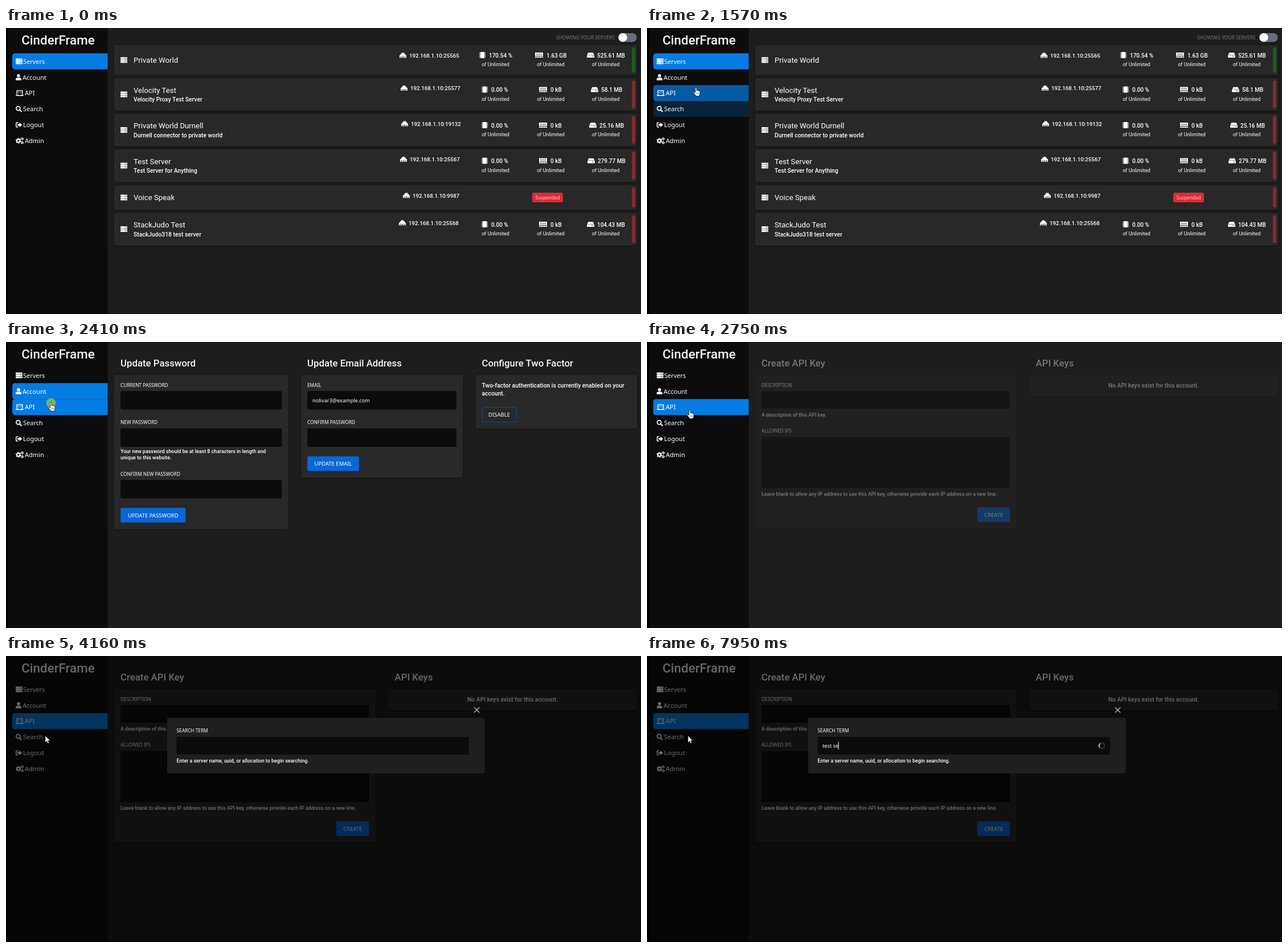
These frames come from a looping animation (1115x502 px, 8000 ms). An HTML page:

```html
<!DOCTYPE html>
<html lang="en">
<head>
<meta charset="utf-8">
<title>Server panel</title>
<style>
html, body { margin: 0; width: 100%; height: 100%; overflow: hidden; background: #1d1d1d; }
svg { display: block; width: 100%; height: 100%; }
text { fill: #fff; white-space: pre; font-family: Roboto, Inter, sans-serif; }
.brand { font-size: 22.4px; font-weight: 500; fill: #f4f4f4; text-anchor: middle; }
.head { font-size: 16.8px; font-weight: 500; fill: #f6f6f6; }
.name { font-size: 13.2px; }
.body { font-size: 10.35px; font-weight: 500; }
.ip { font-size: 9.7px; font-weight: 500; }
.stat { font-size: 10px; font-weight: 500; }
.of { font-size: 9px; text-anchor: middle; }
.hint { font-size: 8.9px; font-weight: 500; }
.nav, .label, .btn, .field, .toggle, .tag { font-family: "Noto Sans", "Open Sans", sans-serif; }
.nav { font-size: 11px; font-weight: 500; }
.label { font-size: 8.3px; }
.btn { font-size: 9.5px; text-anchor: middle; }
.field { font-size: 9.2px; }
.toggle { font-size: 8.5px; fill: #6d7782; }
.tag { font-size: 8.2px; fill: #f3c9cc; text-anchor: middle; }
.mid { text-anchor: middle; }
.card { fill: #282828; filter: drop-shadow(0 1px 2px rgba(0, 0, 0, .35)); }
.input { fill: #0c0c0c; }
.primary { fill: #0967d6; stroke: #0a5dc0; }
.icon { fill: #fff; }
.line { fill: none; stroke: #fff; }
</style>
</head>
<body>
<svg id="stage" viewBox="0 0 1115 502" preserveAspectRatio="none"></svg>
<script>
const LOOP = 8000;
const BLUE = '#047ce4';

const text = (x, y, s, cls) => `<text x="${x}" y="${y}" class="${cls}">${s}</text>`;
const rect = (x, y, w, h, attrs = '', r = 3) =>
  `<rect x="${x}" y="${y}" width="${w}" height="${h}" rx="${r}" ${attrs}/>`;
const card = (x, y, w, h) => rect(x, y, w, h, 'class="card"');
const input = (x, y, w, h) => rect(x, y, w, h, 'class="input"');
const group = (id, inner, attrs = '') => `<g id="${id}" ${attrs}>${inner}</g>`;
const button = (x, y, w, s) =>
  rect(x + .5, y + .5, w - 1, 25, 'class="primary"', 2) + text(x + w / 2, y + 16.5, s, 'btn');

// Icons: left edge at x = 0, vertical centre at y = 0
const icons = {
  server: [-5, -1.5, 2].map(y => rect(0, y, 12, 3, '', .7) +
    `<path d="M7.6 ${y + 1.5}h1m1 0h1" stroke="#333" stroke-width="1"/>`).join(''),
  user: '<circle cx="5" cy="-2.6" r="2.8"/><path d="M0 5.4v-1.4q0-3 3-3h4q3 0 3 3v1.4z"/>',
  laptop: '<path class="line" stroke-width="1.4" d="M2.2 2.2V-4.3H11.8V2.2"/>' +
    '<path class="line" d="M5.8-2.6 4.4-1.1 5.8.4M8.2-2.6 9.6-1.1 8.2.4"/>' +
    '<path d="M0 3h5.4l.4.8h2.4l.4-.8H14q0 2-1.6 2H1.6Q0 5 0 3z"/>',
  search: '<circle class="line" cx="4.4" cy="-1" r="3.5" stroke-width="1.7"/>' +
    '<path class="line" stroke-width="2" stroke-linecap="round" d="M7.2 1.9 10 4.7"/>',
  logout: '<path class="line" stroke-width="1.5" d="M4.2-3.8H1.6Q.8-3.8.8-3V3Q.8 3.8 1.6 3.8H4.2"/>' +
    '<path d="M3.2-1.5H6.6V-4.2L11.2 0 6.6 4.2V1.5H3.2z"/>',
  cogs: '<circle class="line" cx="4.7" cy="0" r="2.7" stroke-width="2"/>' +
    '<circle class="line" cx="4.7" cy="0" r="4.2" stroke-width="1.3" stroke-dasharray="2.2 2.2"/>' +
    [-3.4, 3.4].map(y => `<circle class="line" cx="11.4" cy="${y}" r="1.5" stroke-width="1.2"/>` +
      `<circle class="line" cx="11.4" cy="${y}" r="2.4" stroke-width=".8" stroke-dasharray="1.25 1.25"/>`).join(''),
  net: '<path d="M0 4.5V-.5H1.8V-2.6H3.6V-4.5H8.4V-2.6H10.2V-.5H12V4.5H10.4V1.5H9.4V4.5H7.6V1.5H6.6V4.5H5.4V1.5H4.4V4.5H2.6V1.5H1.6V4.5z"/>',
  cpu: rect(2, -5.5, 7, 11, '', 1) + '<path class="line" stroke-dasharray="1.2 1" d="M.8-4.6V5M10.2-4.6V5" stroke-width="1.6"/>',
  ram: '<path d="M0-4.5H14V-2.3Q13-1.6 14-.9V1.6H0V-.9Q1-1.6 0-2.3zM0 2.4H14V4.5H11.6V3.2H10.8V4.5H7.4V3.2H6.6V4.5H3.2V3.2H2.4V4.5H0z"/>' +
    '<path d="M3.5-3V.2M7-3V.2M10.5-3V.2" stroke="#282828" stroke-width="1.2"/>',
  disk: '<path d="M2.4-4.3H10.6L12.6-.6H.4z"/>' + rect(0, 0, 13, 4.4, '', 1) +
    '<path d="M8 2.2h1.2m.9 0h1.2" stroke="#333" stroke-width="1.2"/>',
};
const icon = (kind, x, y) => `<g class="icon" transform="translate(${x} ${y})">${icons[kind]}</g>`;

const nav = [
  ['Servers', 'server', 30], ['Account', 'user', 29], ['API', 'laptop', 33],
  ['Search', 'search', 30], ['Logout', 'logout', 30], ['Admin', 'cogs', 33],
];

// top, height, name, subtitle, ip x, ip, [x, value] for cpu, ram and disk
const rows = [
  [30, 52.5, 'Private World', '', 708, '192.168.1.10:25565', [[848, '170.54 %'], [949, '1.63 GB'], [1038, '525.61 MB']]],
  [88, 57, 'Velocity Test', 'Velocity Proxy Test Server', 710, '192.168.1.10:25577', [[852, '0.00 %'], [956, '0 kB'], [1045, '58.1 MB']]],
  [150.5, 57, 'Private World Durnell', 'Durnell connector to private world', 711, '192.168.1.10:19132', [[852, '0.00 %'], [956, '0 kB'], [1042, '25.16 MB']]],
  [213, 57, 'Test Server', 'Test Server for Anything', 709, '192.168.1.10:25567', [[852, '0.00 %'], [956, '0 kB'], [1039, '279.77 MB']]],
  [276, 43, 'Voice Speak', '', 714, '192.168.1.10:9987', null],
  [324.5, 57, 'StackJudo Test', 'StackJudo318 test server', 707, '192.168.1.10:25568', [[852, '0.00 %'], [956, '0 kB'], [1038, '104.43 MB']]],
];

function row([y, h, name, sub, ipX, ip, stats], i) {
  const nameY = y + (i ? 21 : 26), ipY = y + (sub ? 17.5 : 18), statY = y + (i ? 20.5 : 18);
  let s = card(190, y, 918, h) +
    rect(190, y + .5, 917.5, h - 1, `id="edge${i}" fill="none" stroke="#e6e6e6" opacity="0"`) +
    rect(1099, y + 4, 6, h - 8, `id="bar${i}" fill="${i ? '#d92f3b' : '#14901c'}" opacity=".5"`) +
    icon('server', 201, y + h / 2) + text(224, nameY + 4.6, name, 'name') +
    icon('net', ipX - 17, ipY) + text(ipX, ipY + 3.6, ip, 'ip');
  if (sub) s += text(224, y + 41, sub, 'body');
  if (stats) {
    s += stats.map(([x, v], k) =>
      icon(['cpu', 'ram', 'disk'][k], x - [17, 20, 18][k], statY - .5) +
      text(x, statY + 3.7, v, 'stat') +
      text([859.5, 956.5, 1053][k], statY + 19, 'of Unlimited', 'of')).join('');
  } else {
    s += rect(924, y + 13, 54, 17, 'fill="#dc2a38"') + text(951, y + 24.6, 'Suspended', 'tag');
  }
  return s;
}

const serversPage = text(966, 19.5, 'SHOWING YOUR SERVERS', 'toggle') +
  rect(1075, 9, 32.5, 15.5, 'fill="#656f7a"', 7.7) + '<circle cx="1083" cy="16.7" r="7.6" fill="#fff"/>' +
  rows.map(row).join('');

const accountPage = text(201, 42.5, 'Update Password', 'head') + card(190, 58, 305.5, 270.5) +
  text(201, 78.7, 'CURRENT PASSWORD', 'label') + input(201, 86, 283.5, 32.5) +
  text(201, 144, 'NEW PASSWORD', 'label') + input(201, 151.5, 283.5, 32.5) +
  text(201, 195, 'Your new password should be at least 8 characters in length and', 'hint') +
  text(201, 206, 'unique to this website.', 'hint') +
  text(201, 234.5, 'CONFIRM NEW PASSWORD', 'label') + input(201, 242, 283.5, 32.5) +
  button(201, 291, 114.5, 'UPDATE PASSWORD') +
  text(529, 42.5, 'Update Email Address', 'head') + card(518, 58, 284, 180) +
  text(529, 78.7, 'EMAIL', 'label') + input(529, 86, 262, 32.5) +
  text(538, 105.7, 'nolivar3@example.com', 'field') +
  text(529, 144, 'CONFIRM PASSWORD', 'label') + input(529, 151.5, 262, 32.5) +
  button(529, 200.5, 91, 'UPDATE EMAIL') +
  text(835.5, 42.5, 'Configure Two Factor', 'head') + card(824.5, 58, 283.5, 94) +
  text(835.5, 79.7, 'Two-factor authentication is currently enabled on your', 'body') +
  text(835.5, 93.5, 'account.', 'body') +
  rect(836, 114.5, 60.5, 26, 'fill="none" stroke="#0c4a93"', 2) + text(866, 131, 'DISABLE', 'btn');

const apiPage = text(201, 42.5, 'Create API Key', 'head') + card(190, 58, 459, 269) +
  text(201, 78.7, 'DESCRIPTION', 'label') + input(201, 86, 436.5, 31) +
  text(201, 131, 'A description of this API key.', 'hint') +
  text(201, 159.3, 'ALLOWED IPS', 'label') + input(201, 167, 436.5, 89.5) +
  text(201, 270.2, 'Leave blank to allow any IP address to use this API key, otherwise provide each IP address on a new line.', 'hint') +
  button(580, 290, 57.5, 'CREATE') +
  text(682.5, 42.5, 'API Keys', 'head') + card(671, 58, 437, 37) +
  text(889.5, 79.7, 'No API keys exist for this account.', 'body mid');

const sidebar = rect(0, 0, 178.5, 502, 'fill="#0c0c0c"', 0) + rect(0, 0, 4, 502, 'fill="#000"', 0) +
  text(91.5, 28.6, 'CinderFrame', 'brand') +
  nav.map(([label, kind, x], i) => {
    const y = 58.4 + 28 * i - .1 * i;
    return `<path id="nav${i}" d="M178.5 ${y - 14}H16q-5 0-5 5v18q0 5 5 5H178.5z" fill="${BLUE}"/>` +
      icon(kind, 17, y) + text(x, y + 4.2, label, 'nav');
  }).join('');

const modal = rect(283, 108.5, 557.5, 97.5, 'fill="#1f1f1f"') +
  '<path d="M822.3 90.5l8.6 8.6m0-8.6l-8.6 8.6" stroke="#b5b5b5" stroke-width="1.4" stroke-linecap="round"/>' +
  text(299.5, 134.3, 'SEARCH TERM', 'label') + input(299.5, 142, 513.5, 31) +
  '<text id="term" x="308" y="160.7" class="field"></text>' +
  rect(0, 150.5, 1, 13.5, 'id="caret" fill="#fff"', 0) +
  text(299.5, 187, 'Enter a server name, uuid, or allocation to begin searching.', 'hint') +
  group('spinner', '<g fill="none" stroke="#fff" stroke-width="1.6"><circle r="4.8" opacity=".22"/>' +
    '<path d="M-3.4-3.4A4.8 4.8 0 0 1 3.4-3.4"/></g>');

const arrow = '<path d="M0 0V11.8L2.7 9.3 4.5 13.4 6.5 12.5 4.7 8.5H8.3z" fill="#fff" stroke="#111" stroke-width=".6"/>';
const hand = '<path d="M-1.2.8Q-1.2-.5 0-.5T1.2.8V5Q2.4 4.3 3.2 5.3 4.5 4.7 5.2 5.8 7 5.5 7 7.3V10.4Q7 12 6 13.2V14.8H-.8V13.4L-4.2 9.2Q-4.8 8-3.7 7.6-2.8 7.4-1.2 9z" fill="#fff" stroke="#111" stroke-width=".8"/>' +
  '<path d="M1.4 8.6V12M3 8.6V12M4.6 8.6V12" stroke="#333" stroke-width=".5"/>';

const stage = document.getElementById('stage');
stage.innerHTML = rect(0, 0, 1115, 502, 'fill="#1d1d1d"', 0) +
  group('servers', serversPage) + group('account', accountPage) + group('api', apiPage) + sidebar +
  rect(0, 0, 1115, 502, 'id="shade" fill="#000"', 0) + group('modal', modal) +
  '<circle id="click" r="8.3" fill="#84bd55" opacity=".9"/>' +
  group('pointer', group('arrow', arrow) + group('hand', hand));

const el = {};
stage.querySelectorAll('[id]').forEach(n => { el[n.id] = n; });

// Tracks are [time, value, ...] and run straight between steps
const fades = {
  servers: [[1830, 1], [1920, .6], [2030, 0]],
  account: [[2030, 0], [2200, 1], [2540, 1], [2680, 0]],
  api: [[2680, 0], [2850, 1]],
  shade: [[3890, 0], [4100, .58]],
  modal: [[3890, 0], [4100, 1]],
  edge4: [[1000, 0], [1070, .27], [1180, 0]],
  edge5: [[640, 0], [790, 1], [1080, 1], [1230, 0]],
  bar5: [[640, .5], [790, .75], [1080, .75], [1230, .5]],
  nav0: [[1830, 1], [1920, .65], [2050, 0]],
  nav1: [[1580, 0], [1700, 1], [2540, 1], [2700, 0]],
  nav2: [[1490, 0], [1570, .7], [1700, 0], [2170, 0], [2300, 1]],
  nav3: [[1400, 0], [1480, .7], [1610, 0], [2850, 0], [3000, 1], [3920, 1], [4080, 0]],
  nav4: [[1310, 0], [1390, .7], [1520, 0]],
  nav5: [[1210, 0], [1300, .7], [1430, 0]],
};
const path = [
  [170, 300, 496], [500, 262, 432], [930, 212, 330], [1000, 192, 300], [1070, 131, 285],
  [1210, 124, 212], [1310, 116, 184], [1400, 106, 156], [1490, 95, 128], [1580, 85, 102],
  [1710, 76, 90], [1930, 76, 90], [2340, 79, 106.5], [2550, 79, 106.5], [3060, 69, 140],
  [4630, 69, 140], [4770, 72, 140],
];
const handSpans = [[640, 1035], [1210, 4050]];
const clicks = [[1780, 1850], [2340, 2550], [3900, 3990]];
const typed = [[0, ''], [5320, 'y'], [5670, 'yr'], [6200, ''], [7000, 't'], [7130, 'te'], [7330, 'tes'],
  [7450, 'test'], [7580, 'test '], [7710, 'test s'], [7840, 'test se']];
const caretSpans = [[4680, 5170], [5320, LOOP]];
const SPIN_START = 7330;

function at(track, t, k = 1) {
  const n = track.findIndex(step => step[0] > t);
  if (n === 0) return track[0][k];
  if (n < 0) return track[track.length - 1][k];
  const a = track[n - 1], b = track[n];
  return a[k] + (b[k] - a[k]) * (t - a[0]) / (b[0] - a[0]);
}
const within = (spans, t) => spans.some(([a, b]) => t >= a && t < b);
const show = (node, on) => { node.style.display = on ? '' : 'none'; };

const spin = el.spinner.animate(
  ['translate(798.5px, 157.5px) rotate(0deg)', 'translate(798.5px, 157.5px) rotate(360deg)'].map(transform => ({ transform })),
  { duration: 1000, iterations: Infinity, easing: 'cubic-bezier(.55, .25, .25, .7)' });
spin.pause();

function draw(t) {
  for (const id in fades) el[id].style.opacity = at(fades[id], t);

  const x = at(path, t, 1), y = at(path, t, 2), isHand = within(handSpans, t);
  show(el.pointer, t >= 170);
  show(el.hand, isHand);
  show(el.arrow, !isHand);
  el.pointer.setAttribute('transform', `translate(${x} ${y})`);
  show(el.click, within(clicks, t));
  el.click.setAttribute('cx', x);
  el.click.setAttribute('cy', y + .5);

  const word = typed.filter(step => step[0] <= t).pop()[1];
  if (el.term.textContent !== word) el.term.textContent = word;
  show(el.caret, within(caretSpans, t));
  el.caret.setAttribute('x', 308 + (word ? el.term.getComputedTextLength() - .5 : 0));

  show(el.spinner, t >= SPIN_START);
  spin.currentTime = Math.max(0, t - SPIN_START);
}

const start = performance.now();
function tick() {
  draw((performance.now() - start) % LOOP);
  requestAnimationFrame(tick);
}
tick();
</script>
</body>
</html>
```
